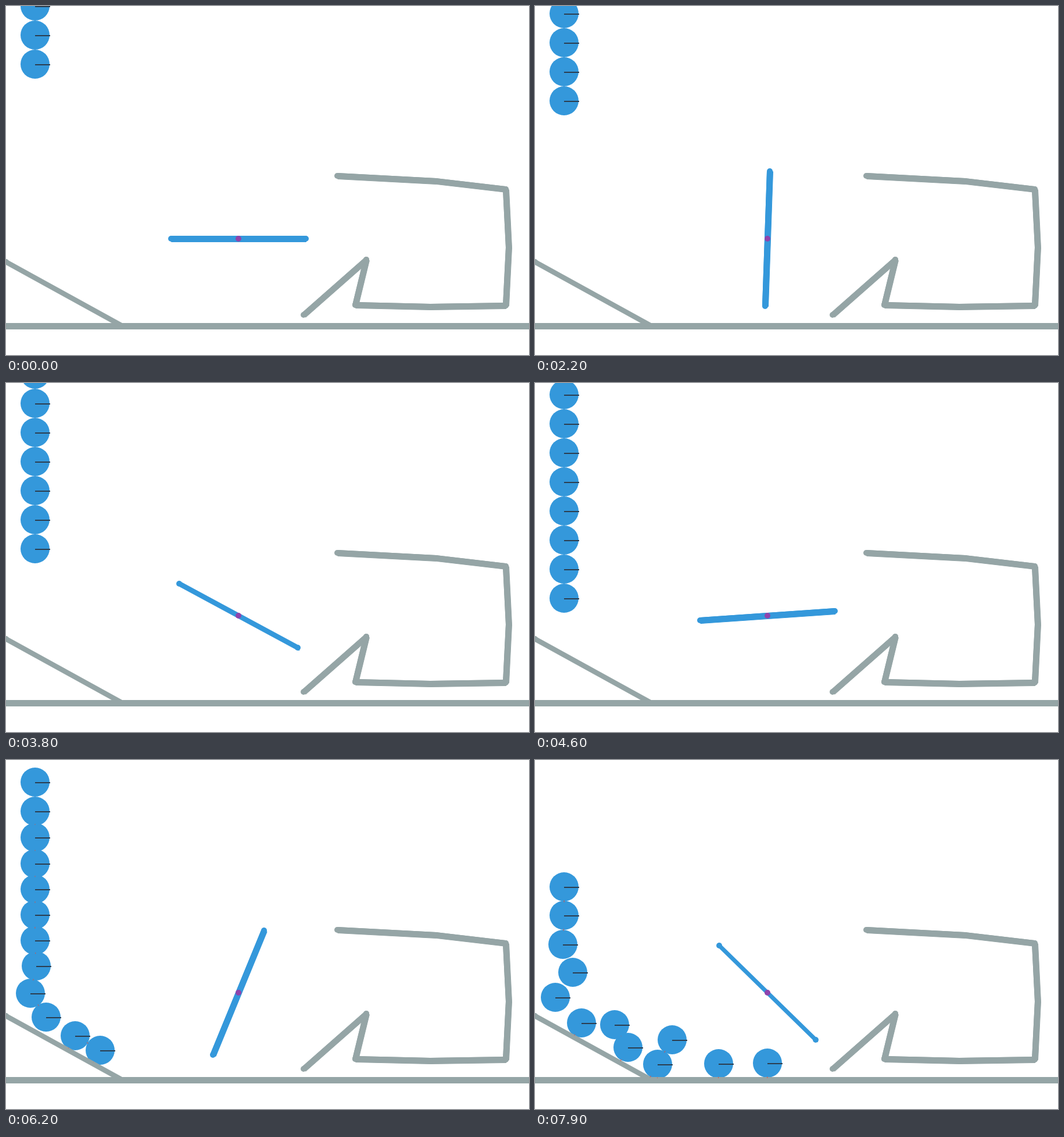
An HTML page with a canvas for the animation above (8000 ms loop, 900x600 px).

```html
<!DOCTYPE html>
<html lang="en">
<head>
<meta charset="utf-8">
<title>Falling balls</title>
<style>
  html, body { margin: 0; width: 100%; height: 100%; overflow: hidden; background: #fff; }
  canvas { display: block; }
</style>
</head>
<body>
<canvas id="stage" width="900" height="600"></canvas>
<script>
const ctx = document.getElementById('stage').getContext('2d');
const STEP = 100, STEPS = 80, BALLS = 12, RADIUS = 25, THICK = 5;
const GRAVITY = 0.25, SLOP = 0.1, BIAS = 0.1, ITERATIONS = 10;
const SPIN = 3.995 * Math.PI / 180, ARM = 116;
const BLUE = '#3498db', GREY = '#95a5a6', DARK = '#2c3e50', PURPLE = '#8e44ad', RED = '#e74c3c';

const SLOPE = [[0, 440], [200, 550]];
const GROUND = [[-20, 550], [920, 550]];
const WALL = [[512, 531], [620, 436], [601, 514], [730, 517], [860, 515],
              [865, 415], [860, 315], [740, 301], [570, 292]];

// --- Physics: frictionless balls, solved with repeated impulses ---

const body = (x, y, inv) => ({ p: [x, y], v: [0, 0], fix: [0, 0], inv });
const FLOOR = body(0, 0, 0);
const along = (p, n, d) => [p[0] + n[0] * d, p[1] + n[1] * d];

function closest([a, b], p) {
  const dx = b[0] - a[0], dy = b[1] - a[1];
  const t = ((p[0] - a[0]) * dx + (p[1] - a[1]) * dy) / (dx * dx + dy * dy);
  return along(a, [dx, dy], Math.min(1, Math.max(0, t)));
}

function contact(key, a, b, pa, ra, old) {
  const dx = b.p[0] - pa[0], dy = b.p[1] - pa[1];
  const dist = Math.hypot(dx, dy), depth = ra + RADIUS - dist;
  if (depth <= 0) return null;
  const n = [dx / dist, dy / dist];
  return {
    key, a, b, n, mass: 1 / (a.inv + b.inv),
    bias: Math.max(0, BIAS * (depth - SLOP)), jFix: 0, j: old.get(key) || 0,
    mark: [along(pa, n, ra - 2), along(b.p, n, 2 - RADIUS)]
  };
}

function findContacts(balls, old) {
  const list = [];
  balls.forEach((b, i) => {
    [SLOPE, GROUND].forEach((s, k) =>
      list.push(contact('s' + k + ',' + i, FLOOR, b, closest(s, b.p), THICK, old)));
    for (let j = i + 1; j < balls.length; j++)
      list.push(contact(i + ',' + j, b, balls[j], b.p, RADIUS, old));
  });
  return list.filter(Boolean);
}

function push({ a, b, n }, kind, j) {
  for (const i of [0, 1]) {
    a[kind][i] -= j * n[i] * a.inv;
    b[kind][i] += j * n[i] * b.inv;
  }
}

const speed = ({ a, b, n }, kind) =>
  (b[kind][0] - a[kind][0]) * n[0] + (b[kind][1] - a[kind][1]) * n[1];

function solve(c) {
  const jFix = Math.max(0, c.jFix + (c.bias - speed(c, 'fix')) * c.mass);
  push(c, 'fix', jFix - c.jFix);
  c.jFix = jFix;
  const j = Math.max(0, c.j - speed(c, 'v') * c.mass);
  push(c, 'v', j - c.j);
  c.j = j;
}

function simulate() {
  const balls = Array.from({ length: BALLS }, (_, i) => body(50, 100 - 50 * i, 1));
  let old = new Map();
  return Array.from({ length: STEPS }, () => {
    for (const b of balls) {
      b.p = [b.p[0] + b.v[0] + b.fix[0], b.p[1] + b.v[1] + b.fix[1]];
      b.fix = [0, 0];
    }
    const contacts = findContacts(balls, old);
    for (const b of balls) b.v[1] += GRAVITY;
    for (const c of contacts) push(c, 'v', c.j);
    for (let i = 0; i < ITERATIONS; i++) contacts.forEach(solve);
    old = new Map(contacts.map(c => [c.key, c.j]));
    return { spots: balls.map(b => b.p.map(Math.round)), marks: contacts.map(c => c.mark) };
  });
}

// --- Drawing ---

function disc(x, y, r, color) {
  ctx.fillStyle = color;
  ctx.beginPath();
  ctx.arc(x, y, r, 0, 7);
  ctx.fill();
}

function band([x1, y1], [x2, y2], ox, oy) {
  ctx.beginPath();
  ctx.moveTo(x1 - ox, y1 - oy);
  ctx.lineTo(x1 + ox, y1 + oy);
  ctx.lineTo(x2 + ox, y2 + oy);
  ctx.lineTo(x2 - ox, y2 - oy);
  ctx.closePath();
  ctx.fill();
}

// Thickness is measured along one axis, so bars falling to the right look thinner.
function bar(a, b, color) {
  const dx = Math.abs(b[0] - a[0]), dy = Math.abs(b[1] - a[1]);
  const s = THICK / Math.hypot(dx, dy);
  ctx.fillStyle = ctx.strokeStyle = color;
  ctx.lineWidth = 1;
  dx >= dy ? band(a, b, 0, THICK) : band(a, b, THICK, 0);
  ctx.save();
  ctx.translate(0.5, 0.5);
  band(a, b, dy * s, dx * s);
  ctx.stroke();
  ctx.restore();
  disc(...a, THICK, color);
  disc(...b, THICK, color);
}

function draw({ spots, marks }, n) {
  ctx.fillStyle = '#fff';
  ctx.fillRect(0, 0, 900, 600);

  for (const [x, y] of spots) {
    disc(x, y, RADIUS, BLUE);
    ctx.fillStyle = DARK;
    ctx.fillRect(x, y, RADIUS + 1, 2);
  }

  bar(...SLOPE, GREY);
  bar(...GROUND, GREY);
  for (let i = 1; i < WALL.length; i++) bar(WALL[i - 1], WALL[i], GREY);

  const dx = Math.round(ARM * Math.cos(n * SPIN)), dy = Math.round(ARM * Math.sin(n * SPIN));
  bar([400 - dx, 400 + dy], [400 + dx, 400 - dy], BLUE);
  disc(400, 400, THICK, PURPLE);

  ctx.strokeStyle = RED;
  ctx.beginPath();
  for (const [from, to] of marks) {
    ctx.moveTo(...from);
    ctx.lineTo(...to);
  }
  ctx.stroke();
}

const frames = simulate();
const start = performance.now();
function tick() {
  const n = Math.floor((performance.now() - start) / STEP) % STEPS;
  draw(frames[n], n);
  requestAnimationFrame(tick);
}
tick();
</script>
</body>
</html>
```
